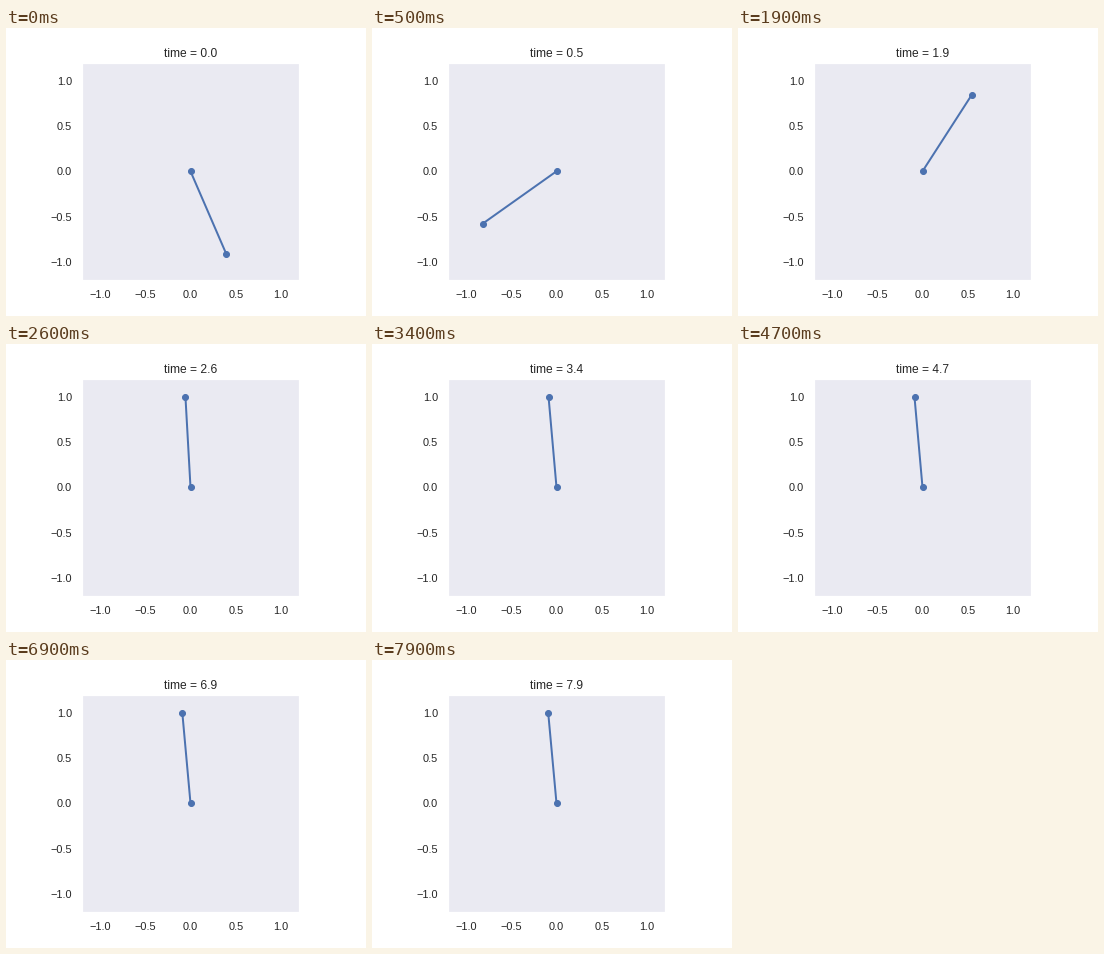
These frames come from a looping animation (360 px wide and 288 px high, 8000 ms). A matplotlib script:

```python
import numpy as np
import matplotlib.pyplot as plt
from matplotlib.animation import FuncAnimation

FRAMES, STEP_MS = 80, 100
SETTLE = 2.7

plt.rcParams.update({
    "font.family": "Liberation Sans",
    "text.color": ".15",
    "axes.labelcolor": ".15",
    "xtick.color": ".15",
    "ytick.color": ".15",
    "axes.facecolor": "#EAEAF2",
    "axes.edgecolor": "white",
    "axes.linewidth": 1.25,
    "axes.titlesize": 12,
    "axes.titlepad": 6,
    "xtick.labelsize": 11,
    "ytick.labelsize": 11,
    "xtick.major.size": 6,
    "ytick.major.size": 6,
    "xtick.bottom": False,
    "ytick.left": False,
    "axes.unicode_minus": True,
})

# Swing-up: time (s), angle from hanging (deg), angular speed (deg/s)
SWING = [
    (0.00, 23.4, -185),
    (0.66, -61.8, 0),
    (0.90, -38.6, 180),
    (1.10, 6.3, 265),
    (1.45, 89.0, 215),
    (1.80, 138.0, 105),
    (1.90, 147.2, 80),
    (SETTLE, 184.3, 5),
]


def hermite(a, b, t):
    (t0, p0, v0), (t1, p1, v1) = a, b
    h = t1 - t0
    s = (t - t0) / h
    return ((1 + 2 * s) * (1 - s) ** 2 * p0 + s * (1 - s) ** 2 * h * v0
            + s * s * (3 - 2 * s) * p1 + s * s * (s - 1) * h * v1)


def angle(t):
    if t >= SETTLE:  # small chatter while balancing just past upright
        return 184.8 - 0.5 * np.cos(11.3 * (t - 6))
    for a, b in zip(SWING, SWING[1:]):
        if t < b[0]:
            return hermite(a, b, t)


fig, ax = plt.subplots(figsize=(5, 4), dpi=72, facecolor="white")
fig.subplots_adjust(left=0.125, right=0.9, bottom=0.125, top=0.88)
ax.set(xlim=(-1.2, 1.2), ylim=(-1.2, 1.2), aspect="equal")
ticks = np.arange(-1, 1.1, 0.5)
ax.set_xticks(ticks)
ax.set_yticks(ticks)
title = ax.set_title("")
rod, = ax.plot([], [], "o-", color="#4C72B0", lw=2, ms=6,
               solid_capstyle="round")


def draw(i):
    t = i * STEP_MS / 1000
    th = np.radians(angle(t))
    rod.set_data([0, np.sin(th)], [0, -np.cos(th)])
    title.set_text(f"time = {t:.1f}")
    return rod, title


anim = FuncAnimation(fig, draw, frames=FRAMES, interval=STEP_MS,
                     repeat=True, repeat_delay=0, blit=False)
plt.show()
```
